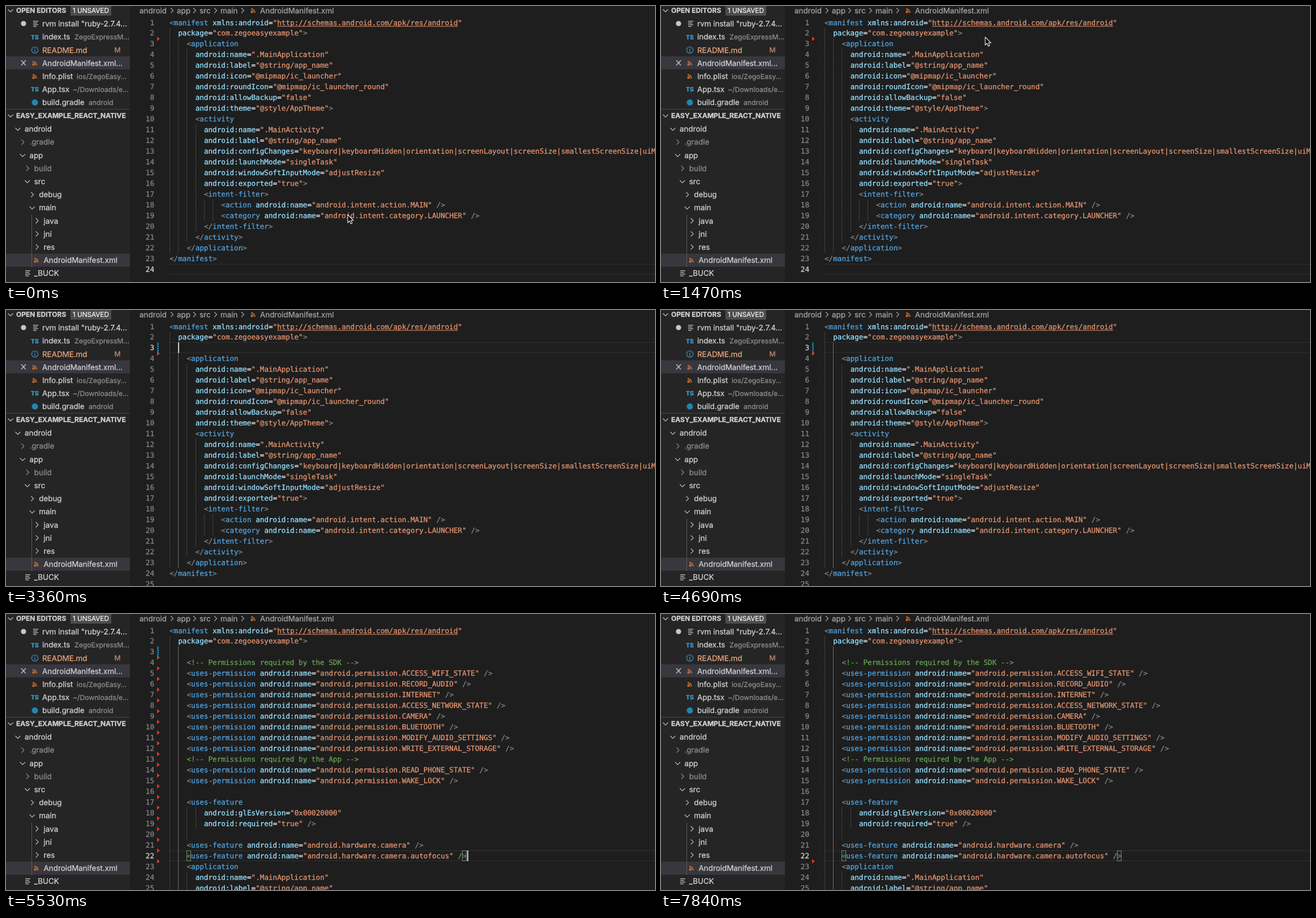
Write an HTML page with a canvas that moves like this. It is 1147 by 488 pixels and loops after 8330 ms.

```html
<!DOCTYPE html>
<html lang="en">
<head>
<meta charset="utf-8">
<title>Adding permissions to the manifest</title>
<style>
html, body { margin: 0; width: 100%; height: 100%; overflow: hidden; background: #1e1e1e; }
canvas { display: block; }
</style>
</head>
<body>
<canvas id="stage" width="1147" height="488"></canvas>
<script>
const ctx = document.getElementById('stage').getContext('2d');
const LOOP = 8330, STEP = 70;
const CODE_X = 289, CHAR = 7.61, LINE_H = 18.96, FIRST_Y = 29;
const MONO = '12.64px "DejaVu Sans Mono", monospace';
const UI = 'Inter, sans-serif';
const COLOR = {
  punct: '#848484', tag: '#52a4e0', attr: '#96e0ff', string: '#e49470',
  comment: '#62a44e', plain: '#dcdcdc', ui: '#d0d0d0', dim: '#8c8c8c', feed: '#e37933', blue: '#3f9cc6'
};

const head = [
  '<manifest xmlns:android="http://schemas.android.com/apk/res/android"',
  '  package="com.zegoeasyexample">'
];
const app = `    <application
      android:name=".MainApplication"
      android:label="@string/app_name"
      android:icon="@mipmap/ic_launcher"
      android:roundIcon="@mipmap/ic_launcher_round"
      android:allowBackup="false"
      android:theme="@style/AppTheme">
      <activity
        android:name=".MainActivity"
        android:label="@string/app_name"
        android:configChanges="keyboard|keyboardHidden|orientation|screenLayout|screenSize|smallestScreenSize|uiMode"
        android:launchMode="singleTask"
        android:windowSoftInputMode="adjustResize"
        android:exported="true">
        <intent-filter>
            <action android:name="android.intent.action.MAIN" />
            <category android:name="android.intent.category.LAUNCHER" />
        </intent-filter>
      </activity>
    </application>
</manifest>
`.split('\n');

const permission = name => `    <uses-permission android:name="android.permission.${name}" />`;
const blank = '    ';
const pasted = [
  '    <!-- Permissions required by the SDK -->',
  ...['ACCESS_WIFI_STATE', 'RECORD_AUDIO', 'INTERNET', 'ACCESS_NETWORK_STATE', 'CAMERA',
    'BLUETOOTH', 'MODIFY_AUDIO_SETTINGS', 'WRITE_EXTERNAL_STORAGE'].map(permission),
  '    <!-- Permissions required by the App -->',
  ...['READ_PHONE_STATE', 'WAKE_LOCK'].map(permission),
  blank,
  '    <uses-feature',
  '        android:glEsVersion="0x00020000"',
  '        android:required="true" />',
  '      ',
  '    <uses-feature android:name="android.hardware.camera" />',
  '    <uses-feature android:name="android.hardware.camera.autofocus" />'
];

const CLICK = 1680, ENTER = 3150, PASTE = 5180;
const documents = [
  { from: 0, lines: [...head, ...app], active: 24 },
  { from: CLICK, lines: [...head, ...app], active: 2, col: 32, pair: [0, 31] },
  { from: ENTER, lines: [...head, blank, ...app], active: 3, col: 2 },
  { from: PASTE, lines: [...head, blank, ...pasted, ...app], active: 22, col: 69 },
  { from: PASTE + STEP, lines: [...head, blank, ...pasted, ...app], active: 22, col: 69, pair: [4, 68] }
];
const caretOn = [[CLICK, 2240], [2730, 3640], [4200, 4690], [PASTE, 5670], [6160, 6720], [7210, 7770]];

// Pointer tracks: time, x, y
const tracks = [
  { shape: arrow, keys: [[0, 604, 369], [70, 604, 369], [1470, 573, 55], [1610, 578, 50]] },
  { shape: beam, keys: [[1610, 580, 51], [2030, 585, 52], [2240, 595, 52], [3080, 595, 52]] },
  { shape: beam, keys: [[6090, 600, 62], [6440, 642, 132], [6930, 700, 232], [7420, 742, 380], [7700, 750, 500]] }
];

const lineY = n => FIRST_Y + (n - 1) * LINE_H;
const colX = c => CODE_X + c * CHAR;

// The thin outline gives the slightly heavier look of smoothed screen text.
function text(str, x, y, color, font, align = 'left') {
  ctx.font = font;
  ctx.fillStyle = ctx.strokeStyle = color;
  ctx.lineWidth = 0.3;
  ctx.textAlign = align;
  ctx.fillText(str, x, y);
  ctx.strokeText(str, x, y);
}
function rect(x, y, w, h, color) {
  ctx.fillStyle = color;
  ctx.fillRect(x, y, w, h);
}
function stroke(color, width, ...points) {
  ctx.strokeStyle = color;
  ctx.lineWidth = width;
  ctx.beginPath();
  points.forEach(([x, y]) => ctx.lineTo(x, y));
  ctx.stroke();
}
function polygon(color, points) {
  ctx.fillStyle = color;
  ctx.beginPath();
  points.forEach(([x, y]) => ctx.lineTo(x, y));
  ctx.closePath();
  ctx.fill();
}
function disc(x, y, r, color) {
  ctx.fillStyle = color;
  ctx.beginPath();
  ctx.arc(x, y, r, 0, 7);
  ctx.fill();
}
function chevron(x, y, down, color = '#c0c0c0') {
  stroke(color, 1.2, ...(down
    ? [[x - 4.5, y - 2], [x, y + 2.5], [x + 4.5, y - 2]]
    : [[x - 2, y - 4.5], [x + 2.5, y], [x - 2, y + 4.5]]));
}

const icons = {
  feed(x, y) {
    disc(x - 3, y + 3, 1.5, COLOR.feed);
    ctx.strokeStyle = COLOR.feed;
    ctx.lineWidth = 1.6;
    for (const r of [4, 7]) {
      ctx.beginPath();
      ctx.arc(x - 4, y + 4, r, -Math.PI / 2, 0);
      ctx.stroke();
    }
  },
  list(x, y) {
    [9, 7, 9, 6].forEach((w, i) => rect(x - 3, y - 5 + i * 3, w, 1.2, '#c8cfd0'));
  },
  ts(x, y) { text('TS', x, y + 4, COLOR.blue, `700 10.5px ${UI}`, 'center'); },
  info(x, y) {
    ctx.strokeStyle = COLOR.blue;
    ctx.lineWidth = 1.1;
    ctx.beginPath();
    ctx.arc(x, y, 5.6, 0, 7);
    ctx.stroke();
    rect(x - 0.7, y - 1, 1.4, 4, COLOR.blue);
    rect(x - 0.7, y - 3.3, 1.4, 1.4, COLOR.blue);
  },
  disc(x, y) { disc(x, y, 5.5, '#2583ad'); }
};

const label = (str, x, y, color = COLOR.ui) => text(str, x, y + 4.8, color, `13.4px ${UI}`);
const heading = (str, y) => {
  chevron(8, y, true);
  text(str, 18, y + 4.3, COLOR.ui, `700 12px ${UI}`);
};

const openFiles = [
  ['list', 'rvm install "ruby-2.7.4...'],
  ['ts', 'index.ts', 'ZegoExpressM...', 121],
  ['info', 'README.md'],
  ['feed', 'AndroidManifest.xml...'],
  ['feed', 'Info.plist', 'ios/ZegoEasy...', 125],
  ['ts', 'App.tsx', '~/Downloads/e...', 118],
  ['disc', 'build.gradle', 'android', 146]
];
// Name, depth, state: open, closed, or an icon
const tree = [
  ['android', 0, 'open'], ['.gradle', 1, 'closed'], ['app', 1, 'open'], ['build', 2, 'closed'],
  ['src', 2, 'open'], ['debug', 3, 'closed'], ['main', 3, 'open'], ['java', 4, 'closed'],
  ['jni', 4, 'closed'], ['res', 4, 'closed'], ['AndroidManifest.xml', 4, 'feed'], ['_BUCK', 2, 'list']
];

function drawSidebar() {
  rect(0, 0, 219, 488, '#252526');
  rect(0, 89, 219, 23, '#37373d');
  rect(0, 438, 219, 23, '#37373d');
  heading('OPEN EDITORS', 8);
  rect(114, 0, 72, 17, '#4d4d4d');
  text('1 UNSAVED', 118, 12.3, '#f0f0f0', `11.7px ${UI}`);

  openFiles.forEach(([icon, name, note, noteX], i) => {
    const y = 31.4 + i * 23.2;
    icons[icon](51, y);
    label(name, 64, y, icon === 'info' ? '#e6a67c' : COLOR.ui);
    if (note) text(note, noteX, y + 4.6, COLOR.dim, `12.2px ${UI}`);
  });
  disc(31, 31, 4.6, '#c8c8c8');
  text('M', 197, 81.8, '#c98e6b', `12.2px ${UI}`, 'center');
  stroke('#cccccc', 1.2, [27, 96], [35, 105]);
  stroke('#cccccc', 1.2, [35, 96], [27, 105]);

  rect(0, 182, 219, 1, '#464647');
  heading('EASY_EXAMPLE_REACT_NATIVE', 194);
  rect(45, 369, 1, 92, '#585858');
  tree.forEach(([name, depth, state], i) => {
    const y = 217.5 + i * 23.18, x = 21 + depth * 8.4;
    const dim = name === '.gradle' || name === 'build';
    if (icons[state]) icons[state](state === 'feed' ? 54 : 37, y);
    else chevron(x, y, state === 'open', dim ? COLOR.dim : undefined);
    label(name, x + 12, y, dim ? COLOR.dim : COLOR.ui);
  });
}

function drawBreadcrumb() {
  const color = '#a4a4a4';
  [['android', 236], ['app', 302], ['src', 342], ['main', 379], ['AndroidManifest.xml', 449]]
    .forEach(([name, x]) => label(name, x, 8, color));
  [293, 333, 370, 418].forEach(x => chevron(x, 8, false, color));
  icons.feed(437, 8);
}

function drawCode(line, n, tokenized) {
  const y = lineY(n) + 4.5;
  const parts = line.matchAll(/<!--.*-->|"[^"]*"|<\/?|\/?>|=|[\w:-]+/g);
  let afterOpen = false;
  for (const { 0: part, index } of parts) {
    const kind = part.startsWith('<!--') ? 'comment'
      : part[0] === '"' ? 'string'
      : /^[<>\/]/.test(part) ? 'punct'
      : part === '=' ? 'plain'
      : afterOpen ? 'tag' : 'attr';
    afterOpen = part[0] === '<';
    text(part, colX(index), y, COLOR[tokenized ? kind : 'plain'], MONO);
  }
}

function drawEditor(t) {
  const doc = documents.findLast(d => t >= d.from);
  const { lines, active, col, pair } = doc;
  const top = Math.round(lineY(active) - 9.5);

  rect(CODE_X, top, 858, 1, '#303030');
  rect(CODE_X, top + 18, 858, 1, '#303030');

  lines.forEach((line, i) => {
    const n = i + 1, y = lineY(n);
    if (y > 500) return;
    const indent = line.search(/\S|$/);
    for (let c = 0; c < indent; c += 2) {
      const lit = c === 2 && t >= CLICK;
      rect(Math.round(colX(c)), y - 9.5, 1, LINE_H, lit ? '#707070' : '#404040');
    }
    text(n, 262, y + 4.5, n === active ? '#d0d0d0' : '#858585', MONO, 'right');
    const fresh = doc.from === PASTE && n > 5 && n < 23;
    drawCode(line, n, !fresh);
  });
  rect(colX(25), 35.5, 42 * CHAR, 1, COLOR.string);

  if (pair) for (const c of pair) {
    ctx.strokeStyle = '#7f8a7f';
    ctx.lineWidth = 1;
    const y = Math.round(lineY(c ? active : active === 2 ? 1 : active) - 9.5);
    rect(colX(c), y + 1, CHAR, 17, 'rgba(0,100,0,.15)');
    ctx.strokeRect(Math.round(colX(c)) + 0.5, y + 0.5, 7, 18);
  }
  if (caretOn.some(([from, to]) => t >= from && t < to))
    rect(Math.round(colX(col)) + (col > 60 ? 1 : 0), top, 2, 19, '#d0d0d0');
}

function drawGutter(t) {
  const [first, last] = t < 3360 ? [2, 2] : t < PASTE ? [3, 3] : t < 5740 ? [3, 22] : [22, 22];
  for (let n = first; n <= last; n++) {
    const y = lineY(n) + 10;
    polygon('#ea3223', [[267, y - 4], [267, y + 4], [271.8, y]]);
  }
  if (first === 3) {
    ctx.save();
    ctx.beginPath();
    ctx.rect(267, 57, 3, 19);
    ctx.clip();
    for (let y = 57; y < 82; y += 4) stroke('#1c8fc0', 1.7, [266, y + 2], [271, y - 3]);
    ctx.restore();
  }
}

function arrow(x, y) {
  const points = [[0, 0], [0, 14], [3.2, 11], [5.4, 16], [7.8, 15], [5.7, 10], [10, 10]]
    .map(([dx, dy]) => [x + dx, y + dy]);
  polygon('#000', points);
  stroke('#f0f0f0', 1.1, ...points, points[0]);
}
function beam(x, y) {
  for (const [color, width] of [['#222', 3], ['#d8d8d8', 1.2]]) {
    stroke(color, width, [x, y - 6], [x, y + 6]);
    stroke(color, width, [x - 3, y - 8], [x, y - 6], [x + 3, y - 8]);
    stroke(color, width, [x - 3, y + 8], [x, y + 6], [x + 3, y + 8]);
    stroke(color, width, [x - 2, y + 2], [x + 2, y + 2]);
  }
}

function drawPointer(t) {
  const track = tracks.find(({ keys }) => t >= keys[0][0] && t < keys.at(-1)[0]);
  if (!track) return;
  const i = track.keys.findIndex(k => k[0] > t);
  const [t0, x0, y0] = track.keys[i - 1], [t1, x1, y1] = track.keys[i];
  let p = (t - t0) / (t1 - t0);
  if (track.shape === arrow) p = p * p * (3 - 2 * p);
  track.shape(x0 + (x1 - x0) * p, y0 + (y1 - y0) * p);
}

function frame(now) {
  const t = Math.floor((now % LOOP) / STEP) * STEP;
  ctx.textRendering = 'geometricPrecision';
  rect(0, 0, 1147, 488, '#1e1e1e');
  drawEditor(t);
  drawGutter(t);
  drawBreadcrumb();
  drawSidebar();
  drawPointer(t);
}

const start = performance.now();
(function tick() {
  frame(performance.now() - start);
  requestAnimationFrame(tick);
})();
</script>
</body>
</html>
```
